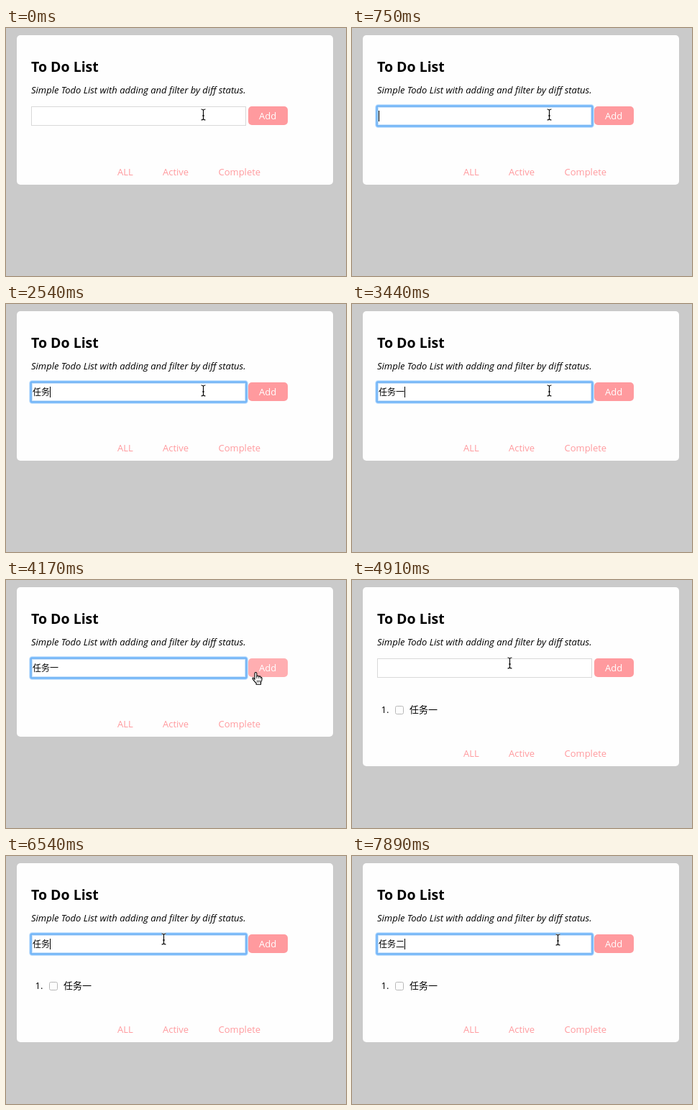
These frames come from a looping animation (473x345 px, 8000 ms). An HTML page:

```html
<!DOCTYPE html>
<html lang="zh-CN">
<head>
<meta charset="utf-8">
<title>To Do List</title>
<style>
html, body { margin: 0; width: 100%; height: 100%; overflow: hidden; background: #cacaca; }
#stage { position: absolute; left: 0; top: 0; width: 473px; height: 345px; overflow: hidden; }
svg { display: block; }
text { font: 13px "Open Sans", "Noto Sans CJK SC", sans-serif; white-space: pre; }
.title { font-size: 19.5px; font-weight: 700; }
.sub { font-style: italic; }
.links text { fill: #ff9a9e; }
#value { font-size: 12px; }
#ime {
  position: absolute; top: 137px; height: 37px; box-sizing: border-box;
  display: flex; gap: 11.3px; padding: 0 16px 0 19.5px;
  font: 16px/37px "Noto Sans CJK SC", sans-serif; color: #555; white-space: pre;
  box-shadow: 0 2px 4px rgba(0, 0, 0, .28);
  background:
    radial-gradient(circle at 1px 2.6px, #b8b8b8 1.8px, transparent 2.4px) 0 2px / 5px 5.2px repeat-y,
    linear-gradient(#fbd3cd, #fbd3cd) 8px 0 / 1px 100% no-repeat,
    linear-gradient(#fbd3cd, #fbd3cd) 11px 0 / 1px 100% no-repeat,
    #fcfcfc;
}
#ime span:first-child { color: #f57c0a; }
#ime svg { margin-left: 4px; }
</style>
</head>
<body>
<div id="stage">
  <svg width="473" height="345" viewBox="0 0 473 345">
    <rect id="card" x="15" y="10" width="440" height="208" rx="5" fill="#fefefe"/>
    <text class="title" x="35" y="61">To Do List</text>
    <text class="sub" x="35" y="91">Simple Todo List with adding and filter by diff status.</text>

    <rect x="35.5" y="109.5" width="298" height="26" fill="#fff" stroke="#d9d9d9"/>
    <g id="ring" fill="none" stroke="#66b0fa">
      <rect x="34.5" y="108.5" width="300" height="28" rx="2" stroke-width="5" opacity=".35"/>
      <rect x="34.5" y="108.5" width="300" height="28" rx="1.5" stroke-width="2.4" opacity=".85"/>
    </g>
    <text id="value" x="37" y="127"></text>
    <rect id="under" y="129" height="1"/>
    <rect id="caret" y="115" width="1" height="15"/>

    <rect id="button" x="337" y="109" width="55" height="26" rx="5"/>
    <text x="352" y="127" fill="#fff">Add</text>

    <g id="item">
      <text x="40.5" y="185">1.</text>
      <rect x="60.5" y="175.5" width="11" height="11" rx="2" fill="#fdfdfd" stroke="#b8b8b8"/>
      <text x="80" y="185">任务一</text>
    </g>
    <g id="links" class="links">
      <text x="155" y="205">ALL</text>
      <text x="218" y="205">Active</text>
      <text x="295.5" y="205">Complete</text>
    </g>

    <g id="beam" fill="none">
      <path id="beamShape" stroke="#fff" stroke-width="2.6" opacity=".8"
        d="M-3-7.5Q-.5-7.5 0-6Q.5-7.5 3-7.5M0-6V6M-3 7.5Q-.5 7.5 0 6Q.5 7.5 3 7.5M-1.5 1.5H1.5"/>
      <path stroke="#000" stroke-width="1.1"
        d="M-3-7.5Q-.5-7.5 0-6Q.5-7.5 3-7.5M0-6V6M-3 7.5Q-.5 7.5 0 6Q.5 7.5 3 7.5M-1.5 1.5H1.5"/>
    </g>
    <g id="hand" stroke="#000" stroke-linejoin="round">
      <path fill="#fff" stroke-width="1.1" d="M4.5 11.5V3.2Q4.5 1.5 5.9 1.5T7.4 3.2V7.2Q7.7 6.3 8.9 6.3T10.3 7.4Q10.7 6.8 11.7 6.9T12.9 8.2Q14.6 8 14.6 10Q14.6 13.5 13 15.8V18.3H6.6V16.5Q4.5 14.5 2.5 11.9Q.9 9.7 2 9Q3.2 8.6 4.5 11.5Z"/>
      <path fill="none" stroke-width=".8" d="M7.4 7V10M10.3 7.4V10M12.9 8.2V10.3M8 12.5V15.5M10 12.5V15.5M12 12.5V15.5"/>
    </g>
  </svg>
  <div id="ime"></div>
</div>
<script>
const LOOP = 8000;
const $ = id => document.getElementById(id);
const ARROWS = `<svg width="10" height="37" fill="none" stroke-width="1.5">
  <path d="M.8 15.5 5 11.5 9.2 15.5" stroke="#fbcfa6"/><path d="M.8 24 5 28 9.2 24" stroke="#f57c0a"/></svg>`;

const WORDS = {
  r: '人 让 如果 日 然后',
  re: '热 惹 喏 若 re',
  ren: '人 任 认 仁 忍',
  renw: '任务 人物 认为 人为 人文',
  renwu: '任务 人物 人无 人五 认误',
  y: '一 有 要 也 与',
  yi: '一 以 已 亿 意',
  e: '而 嗯 额 饿 恶',
  er: '二 而 而且 儿子 耳朵'
};

const blank = { text: '', typed: '', focus: 0, caret: 0, hover: 0, item: 0, hand: 0, at: [274, 120] };
const type = typed => ({ typed, caret: 1 });
const commit = text => ({ text, typed: '', caret: 1 });

// Each step changes only the listed parts of the previous state.
const steps = [
  [0, {}],
  [750, { focus: 1, caret: 1 }],
  [1350, { caret: 0 }],
  [1800, type('re')],
  [1950, type('ren')],
  [2100, type('renw')],
  [2250, type('renwu')],
  [2540, commit('任务')],
  [2840, type('y')],
  [2990, type('yi')],
  [3440, commit('任务一')],
  [3880, { at: [296, 124] }],
  [4030, { at: [327, 131], caret: 0 }],
  [4170, { at: [341.5, 127], hand: 1, hover: 1 }],
  [4320, { text: '', focus: 0, item: 1 }],
  [4620, { at: [318, 127], hand: 0, hover: 0 }],
  [4770, { at: [246, 118] }],
  [4910, { at: [219, 115] }],
  [5060, { focus: 1, caret: 1 }],
  [5510, type('r')],
  [5660, type('re')],
  [5800, type('ren')],
  [6100, type('renw')],
  [6250, type('renwu')],
  [6540, commit('任务')],
  [7140, type('e')],
  [7290, type('er')],
  [7740, commit('任务二')],
  [7890, { at: [286, 116] }]
];

let last = blank;
const states = steps.map(([time, change]) => (last = { ...last, ...change, time }));

const show = (id, on) => { $(id).style.display = on ? '' : 'none'; };
const move = (id, x, y) => $(id).setAttribute('transform', `translate(${x} ${y})`);

function draw(s) {
  show('ring', s.focus);
  show('caret', s.caret);
  show('item', s.item);
  show('hand', s.hand);
  show('beam', !s.hand);
  show('ime', s.typed);
  show('under', s.typed);

  $('card').setAttribute('height', s.item ? 249 : 208);
  move('links', 0, s.item ? 41 : 0);
  $('button').setAttribute('fill', s.hover ? '#ffaeb1' : '#ff9a9e');
  move(s.hand ? 'hand' : 'beam', s.hand ? s.at[0] : s.at[0] + .5, s.at[1] + (s.hand ? 0 : .5));

  const value = $('value');
  value.textContent = s.text + s.typed;
  const start = s.text.length * 12;
  const end = value.textContent ? Math.round(value.getComputedTextLength()) : 0;
  $('caret').setAttribute('x', 37 + end);
  $('under').setAttribute('x', 37 + start);
  $('under').setAttribute('width', Math.max(0, end - start));

  if (s.typed) {
    $('ime').style.left = 11 + start + 'px';
    $('ime').innerHTML = WORDS[s.typed].split(' ')
      .map((word, i) => `<span>${i + 1}.${word}</span>`).join('') + ARROWS;
  }
}

let shown;
function tick() {
  const t = performance.now() % LOOP;
  const now = states.filter(s => s.time <= t).pop();
  if (now !== shown) draw(shown = now);
  requestAnimationFrame(tick);
}
tick();
</script>
</body>
</html>
```
